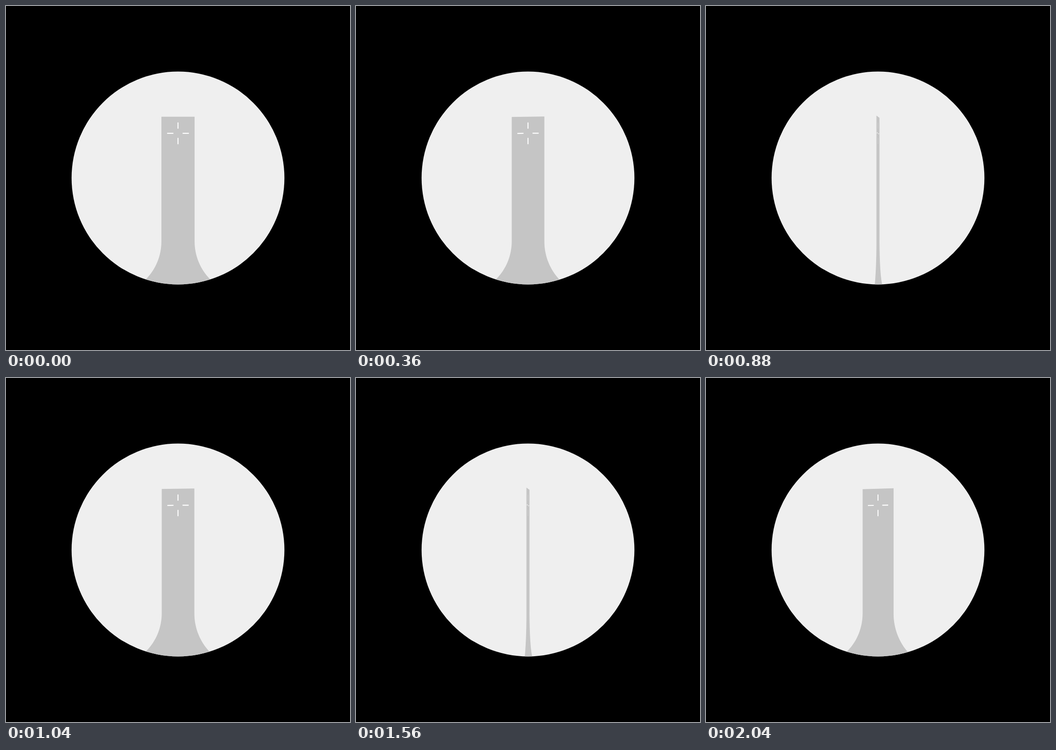
Recreate the animation shown at these times as an HTML page. Size 748x748 px, loop 2.08 s.

```html
<!DOCTYPE html>
<html lang="en">
<head>
<meta charset="utf-8">
<title>Turning pillar</title>
<style>
  html, body { margin: 0; width: 100%; height: 100%; overflow: hidden; background: #000; }
  svg { display: block; width: 100%; height: 100%; }
</style>
</head>
<body>
<svg viewBox="0 0 748 748">
  <clipPath id="disc"><circle cx="374" cy="374" r="231.4"/></clipPath>
  <circle cx="374" cy="374" r="231.4" fill="#efefef"/>
  <g clip-path="url(#disc)">
    <path id="pillar" fill="#c5c5c5"/>
    <path id="cross" fill="#fff"/>
  </g>
</svg>
<script>
const STEP = 40, LOOP = 2080, STEPS_PER_TURN = 17;
const CENTER = 374, DEPTH = 1847;
const HALF = 36.1, TOP = -133.2, FLARE_Y = 138, FLARE_R = 117, BOTTOM = 300;
const CROSS_Y = -97.2, INNER = 10, OUTER = 23.6, THIN = 1.1;

// Right half of the outline, from the top down; points are relative to the centre.
const side = [[HALF, TOP]];
for (let i = 0; i <= 32; i++) {
  const a = i / 32 * Math.PI / 2;
  side.push([HALF + FLARE_R * (1 - Math.cos(a)), FLARE_Y + FLARE_R * Math.sin(a)]);
}
side.push([HALF + FLARE_R, BOTTOM]);
const outline = [...side, ...side.map(([x, y]) => [-x, y]).reverse()];

const rect = (x0, y0, x1, y1) => [[x0, y0], [x1, y0], [x1, y1], [x0, y1]];
const ticks = [-1, 1].flatMap(s => [
  rect(s * INNER, CROSS_Y - THIN, s * OUTER, CROSS_Y + THIN),
  rect(-THIN, CROSS_Y + s * INNER, THIN, CROSS_Y + s * OUTER)
]);

const pillar = document.getElementById('pillar');
const cross = document.getElementById('cross');

// Turn a flat shape about the vertical axis and project it with perspective.
function project(points, angle) {
  const c = Math.cos(angle), s = Math.sin(angle);
  const placed = points.map(([x, y]) => {
    const scale = DEPTH / (DEPTH + x * s);
    return (CENTER + x * c * scale).toFixed(2) + ' ' + (CENTER + y * scale).toFixed(2);
  });
  return 'M' + placed.join('L') + 'Z';
}

function draw(now) {
  // The first pose is held for two steps.
  const step = Math.max(0, Math.floor(now % LOOP / STEP) - 1);
  const angle = step % STEPS_PER_TURN / STEPS_PER_TURN * 2 * Math.PI;
  pillar.setAttribute('d', project(outline, angle));
  cross.setAttribute('d', ticks.map(t => project(t, angle)).join(''));
}

const start = performance.now();
function tick() {
  draw(performance.now() - start);
  requestAnimationFrame(tick);
}
tick();
</script>
</body>
</html>
```
